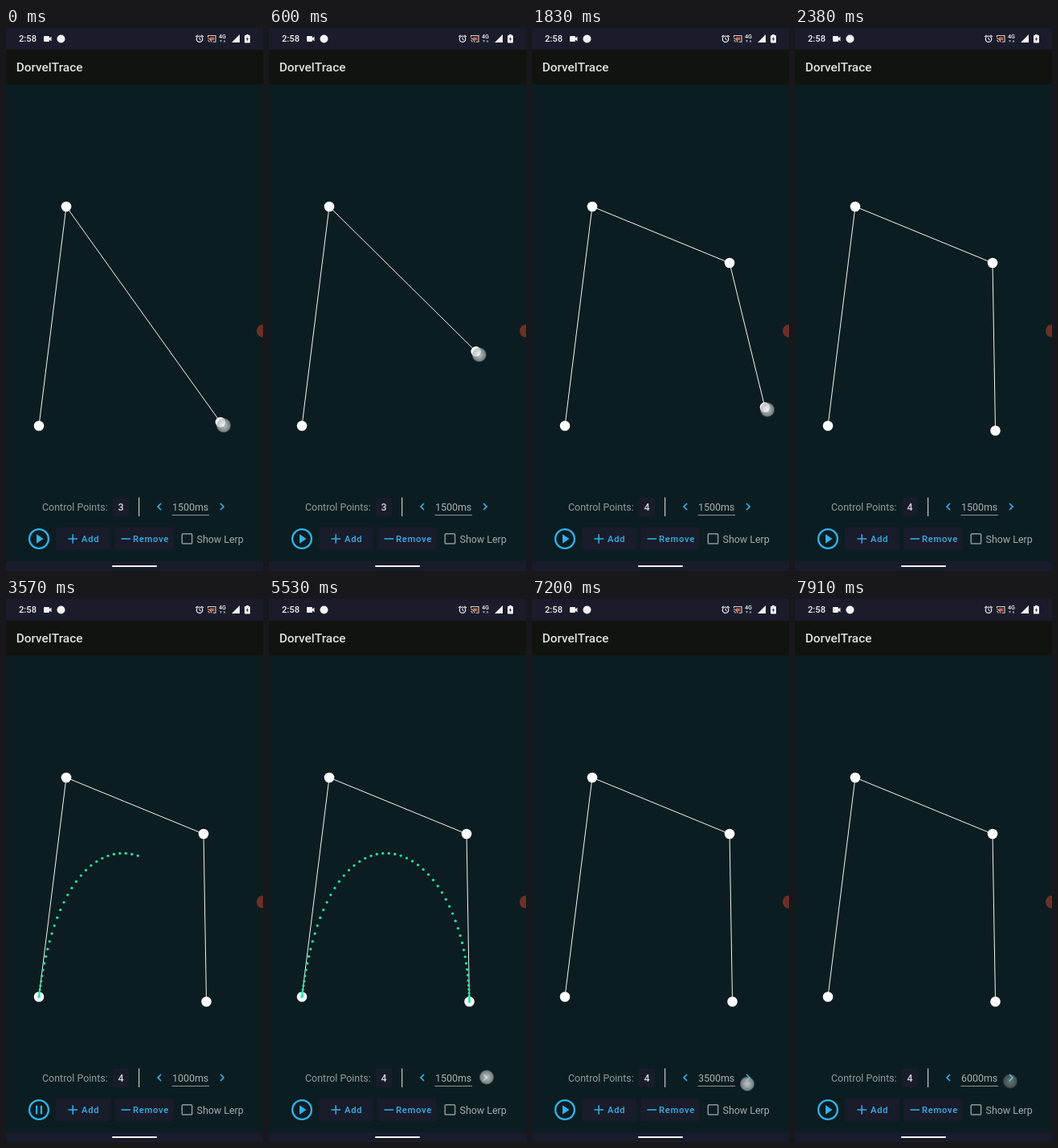
An HTML page with a canvas that plays this animation: 320 by 675 pixels, repeating every 7.99 s.

```html
<!DOCTYPE html>
<html lang="en">
<head>
<meta charset="utf-8">
<title>Curve editor</title>
<style>
  html, body { margin: 0; width: 100%; height: 100%; overflow: hidden; background: #0b1d21; }
  canvas { display: block; width: 320px; height: 675px; }
</style>
</head>
<body>
<canvas id="stage"></canvas>
<script>
const W = 320, H = 675, LOOP = 7990;
const BLUE = '#30b3ec', PANEL = '#191c2a', GREY = '#929c9e';
const canvas = document.getElementById('stage');
const ctx = canvas.getContext('2d');
const ratio = window.devicePixelRatio || 1;
canvas.width = W * ratio;
canvas.height = H * ratio;

// Moments of the interaction, in ms
const ADD_AT = 1170, SLOWER_AT = 2760, PLAY_AT = 3050, RUN = 1000;
const FASTER_AT = 5530, CLEAR_AT = 5610;
const TAP_AT = 6490, TAP_GAP = 165, TAP_HOLD = 60, TAPS = 9;

const clamp = v => Math.max(0, Math.min(1, v));
const mix = (a, b, u) => a + (b - a) * u;
const ease = u => (1 - Math.cos(Math.PI * clamp(u))) / 2;
const glide = (a, b, from, to, t) => {
  const u = ease((t - from) / (to - from));
  return [mix(a[0], b[0], u), mix(a[1], b[1], u)];
};

function rect(x, y, w, h, color, r = 0) {
  ctx.fillStyle = color;
  ctx.beginPath();
  ctx.roundRect(x, y, w, h, r);
  ctx.fill();
}

function disc(x, y, r, color) {
  ctx.fillStyle = color;
  ctx.beginPath();
  ctx.arc(x, y, r, 0, Math.PI * 2);
  ctx.fill();
}

function ring(x, y, r, color, width) {
  ctx.strokeStyle = color;
  ctx.lineWidth = width;
  ctx.beginPath();
  ctx.arc(x, y, r, 0, Math.PI * 2);
  ctx.stroke();
}

function trace(points) {
  ctx.beginPath();
  points.forEach(([x, y]) => ctx.lineTo(x, y));
}

function line(points, color, width) {
  trace(points);
  ctx.strokeStyle = color;
  ctx.lineWidth = width;
  ctx.stroke();
}

function shape(points, color) {
  trace(points);
  ctx.fillStyle = color;
  ctx.fill();
}

function text(str, x, y, size, color, weight = 400, spacing = 0, align = 'left') {
  ctx.font = `${weight} ${size}px Roboto, sans-serif`;
  ctx.letterSpacing = spacing + 'px';
  ctx.textAlign = align;
  ctx.fillStyle = color;
  ctx.fillText(str, x, y);
}

function statusBar() {
  const white = '#f2f2f4';
  rect(0, 0, W, 27, '#1a1c2b');
  text('2:58', 16, 17.3, 11.2, white, 500);
  rect(47, 10, 7, 7, white, 1);
  shape([[53.5, 13], [56.5, 10.5], [56.5, 16.5], [53.5, 14]], white);
  disc(68.5, 13.5, 5, white);

  ring(241, 13.7, 3.7, white, 1.2);
  line([[241, 11.5], [241, 14], [242.8, 15]], white, 1);
  line([[236.2, 11], [238.7, 8.9]], white, 1.2);
  line([[243.3, 8.9], [245.8, 11]], white, 1.2);

  const cast = '#e8c8bc';
  line([[251.5, 11.5], [251.5, 9.5], [261, 9.5], [261, 17.2], [257.5, 17.2]], cast, 1.1);
  rect(254, 11.5, 5.2, 3.7, '#b9674f');
  [2, 4.5].forEach(r => {
    ctx.strokeStyle = cast;
    ctx.beginPath();
    ctx.arc(251.2, 17.5, r, -Math.PI / 2, 0);
    ctx.stroke();
  });

  text('4G', 265, 12.6, 7.2, white, 500);
  shape([[266, 15], [269, 15], [267.5, 18]], GREY);
  shape([[270.5, 17.5], [273.5, 17.5], [272, 14.5]], GREY);
  shape([[281, 18], [291, 8], [291, 18]], white);
  rect(297, 9, 7, 9.5, white, 1);
  rect(299, 8, 3, 2, white);
  shape([[301, 10.8], [299, 14.3], [300.3, 14.3], [300, 16.8], [302, 13.2], [300.7, 13.2]], '#1a1c2b');
}

function pointsAt(t) {
  const points = [[41, 494.5], [75, 222], glide([267, 490], [246, 292], 290, 960, t)];
  if (t >= ADD_AT) points.push(glide([290, 471.5], [249.5, 500.5], 1860, 2300, t));
  return points;
}

function bezier(p, u) {
  const v = 1 - u;
  const axis = i => v ** 3 * p[0][i] + 3 * v * v * u * p[1][i] + 3 * v * u * u * p[2][i] + u ** 3 * p[3][i];
  return [axis(0), axis(1)];
}

function editor(t) {
  const points = pointsAt(t);
  line(points, '#f2f6f5', 1);
  points.forEach(([x, y]) => disc(x, y, 6.3, '#fff'));
  if (t >= PLAY_AT && t < CLEAR_AT) {
    const last = Math.min(60, Math.floor((t - PLAY_AT) / RUN * 60));
    for (let k = 0; k <= last; k++) disc(...bezier(points, ease(k / 60)), 1.6, '#25eba8');
  }
  disc(320, 376.5, 8, '#6c3027');
}

function durationAt(t) {
  if (t < SLOWER_AT) return 1500;
  if (t < FASTER_AT) return 1000;
  const taps = Math.floor((t - TAP_AT - TAP_HOLD) / TAP_GAP) + 1;
  return 1500 + 500 * Math.max(0, Math.min(TAPS, taps));
}

function chevron(x, dir) {
  line([[x - 2 * dir, 591], [x + 2 * dir, 595], [x - 2 * dir, 599]], BLUE, 1.7);
}

function controls(t) {
  text('Control Points:', 45, 600, 12.44, GREY);
  rect(133, 584, 20, 23, PANEL, 2);
  text(t < ADD_AT ? '3' : '4', 143, 600, 12.44, '#d5d8da', 500, 0, 'center');
  rect(165, 583.5, 1.2, 23.5, '#c3cacb');
  chevron(191, -1);
  text(durationAt(t) + 'ms', 207, 600, 12.44, '#a7b0b2');
  rect(206.5, 605, 46.5, 1, '#8b9799');
  chevron(269, 1);

  ring(41, 635, 11.9, BLUE, 2.3);
  if (t >= PLAY_AT && t < PLAY_AT + RUN) {
    rect(37, 629.7, 2.2, 10.6, BLUE);
    rect(42.8, 629.7, 2.2, 10.6, BLUE);
  } else {
    shape([[38, 629.3], [46.5, 635], [38, 640.7]], BLUE);
  }

  rect(62, 620.5, 68, 28.5, PANEL, 3);
  const press = t < 1100 ? 0 : 1 - clamp((t - 1230) / 300);
  if (press) rect(62, 620.5, 68, 28.5, `rgba(38,88,114,${0.8 * press})`, 3);
  line([[77.5, 635], [89, 635]], BLUE, 1.5);
  line([[83.2, 629.3], [83.2, 640.7]], BLUE, 1.5);
  text('Add', 94, 639.3, 11.2, BLUE, 500, 0.75);

  rect(135, 620.5, 73.5, 28.5, PANEL, 3);
  line([[143.5, 635], [155, 635]], BLUE, 1.5);
  text('Remove', 158, 639.3, 11.2, BLUE, 500, 0.75);

  ctx.strokeStyle = '#8d989a';
  ctx.lineWidth = 1.5;
  ctx.beginPath();
  ctx.roundRect(219.2, 628.7, 12.4, 12.4, 1.2);
  ctx.stroke();
  text('Show Lerp', 237.5, 639.5, 12.44, '#a3acae');
}

function touch(t, down, up, x, y, fade = 120) {
  if (t < down || t >= up + fade) return;
  ctx.globalAlpha = 1 - clamp((t - up) / fade);
  const glow = ctx.createRadialGradient(x, y, 0, x, y, 9.5);
  glow.addColorStop(0, 'rgba(235,238,238,.82)');
  glow.addColorStop(0.4, 'rgba(205,210,210,.75)');
  glow.addColorStop(0.82, 'rgba(165,172,172,.7)');
  glow.addColorStop(1, 'rgba(150,158,158,0)');
  disc(x, y, 9.5, glow);
  ctx.globalAlpha = 1;
}

function touches(t) {
  const points = pointsAt(t);
  touch(t, 0, 970, points[2][0] + 4, points[2][1] + 4, 70);
  touch(t, 1100, ADD_AT, 92.5, 639);
  if (points[3]) touch(t, 1830, 2310, points[3][0] + 3, points[3][1] + 3, 70);
  touch(t, 2680, SLOWER_AT, 191, 597);
  touch(t, 2970, PLAY_AT, 42, 637);
  touch(t, FASTER_AT, 5640, 271, 594.5);
  touch(t, 6060, 6420, ...glide([269, 600], [266, 608.5], 6060, 6400, t), 60);
  for (let i = 0; i < TAPS; i++) {
    const down = TAP_AT + i * TAP_GAP;
    touch(t, down, down + TAP_HOLD, 268, mix(606, 599.5, i / (TAPS - 1)), 85);
  }
}

function draw(now) {
  const t = now % LOOP;
  ctx.setTransform(ratio, 0, 0, ratio, 0, 0);
  rect(0, 0, W, H, '#0b1d21');
  rect(0, 27, W, 43, '#11140e');
  statusBar();
  text('DorvelTrace', 12.7, 54.3, 15.4, '#e0e1dc', 500);
  editor(t);
  controls(t);
  rect(0, 663, W, 12, PANEL);
  rect(132, 668, 56, 2, '#f4f4f5', 1);
  touches(t);
}

const start = performance.now();
function tick() {
  draw(performance.now() - start);
  requestAnimationFrame(tick);
}
tick();
</script>
</body>
</html>
```
